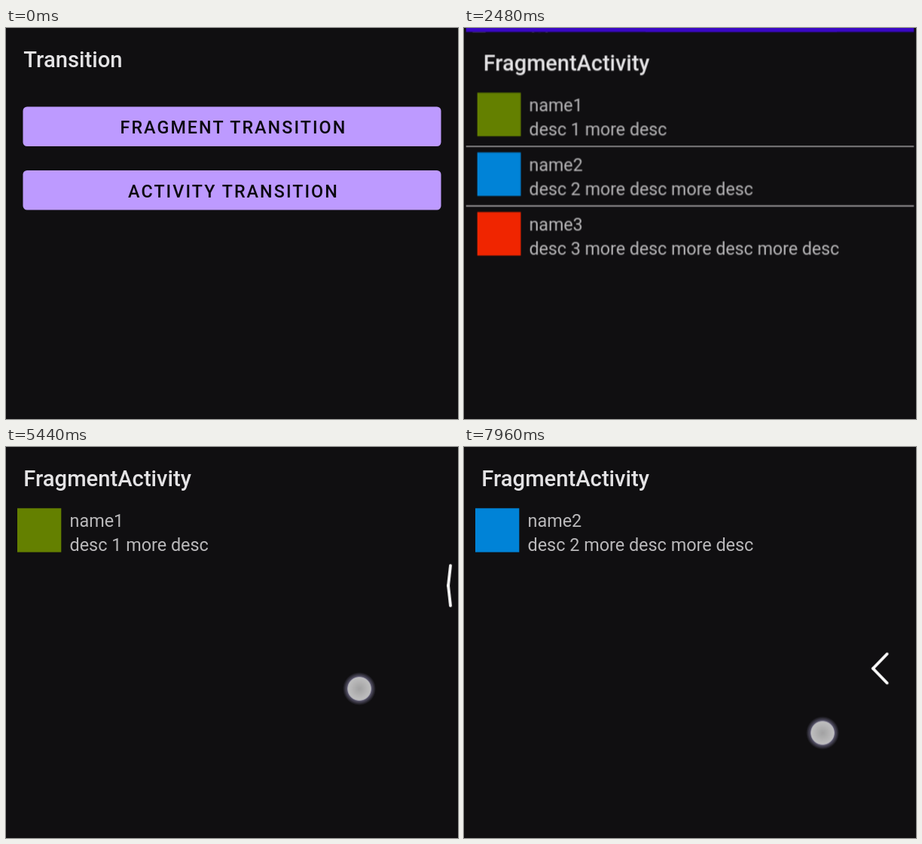
These frames come from a looping animation (600 px wide and 519 px high, 8000 ms). An HTML page:

```html
<!DOCTYPE html>
<html lang="en">
<head>
<meta charset="utf-8">
<title>Screen transitions</title>
<style>
  html, body { margin: 0; width: 100%; height: 100%; overflow: hidden; background: #100f11; }
  svg { display: block; width: 600px; height: 519px; font-family: Roboto, "Noto Sans", sans-serif; }
  svg * { animation: 8s linear infinite; }

  .title { font-size: 29.2px; font-weight: 500; fill: #e4e3e5; }
  .label { font-size: 23.3px; font-weight: 500; letter-spacing: .0893em; text-anchor: middle; fill: #0b0910; }
  .item { font-size: 23.4px; fill: #b9b8ba; }
  .bg { fill: #100f11; }
  .button { fill: #bd9aff; }
  .rule { fill: #b4b3b5; }

  /* 1% = 80 ms */
  .home, .list { transform-origin: 300px 590px; }
  .home { animation-name: grow; }
  .list { animation-name: open, appear; }
  @keyframes grow {
    0%, 28.675% { transform: scale(1); animation-timing-function: cubic-bezier(.3, 0, .8, .15); }
    29.512% { transform: scale(1.0192); animation-timing-function: cubic-bezier(.05, .7, .1, 1); }
    33.675%, 100% { transform: scale(1.048); }
  }
  @keyframes open {
    0%, 28.675% { transform: scale(.85); animation-timing-function: cubic-bezier(.3, 0, .8, .15); }
    29.512% { transform: scale(.91); animation-timing-function: cubic-bezier(.05, .7, .1, 1); }
    33.675%, 100% { transform: scale(1); }
  }
  @keyframes appear {
    0%, 29.3% { opacity: 0; }
    29.925%, 100% { opacity: 1; }
  }

  .ripple { animation-name: ripple, ripple-fade; }
  @keyframes ripple {
    0%, 25.8% { transform: translate(520px, 136px) scale(.05); animation-timing-function: cubic-bezier(.4, 0, .2, 1); }
    29.8%, 100% { transform: translate(300px, 131px) scale(1); }
  }
  @keyframes ripple-fade {
    0%, 25.8% { opacity: 0; }
    26.7%, 29.5% { opacity: .1; }
    31.5%, 100% { opacity: 0; }
  }

  .first { animation-name: first; animation-timing-function: step-end; }
  .second { animation-name: second, lift; animation-timing-function: step-end, linear; }
  .rest { animation-name: rest; animation-timing-function: step-end; }
  @keyframes first {
    0% { opacity: 1; }
    85.75%, 100% { opacity: 0; }
  }
  @keyframes second {
    0% { opacity: 1; }
    56.1% { opacity: 0; }
    73%, 100% { opacity: 1; }
  }
  @keyframes rest {
    0% { opacity: 1; }
    56.1% { opacity: 0; }
    73% { opacity: 1; }
    85.75%, 100% { opacity: 0; }
  }
  @keyframes lift {
    0%, 85.75% { transform: translateY(0); animation-timing-function: cubic-bezier(.37, 0, .63, 1); }
    89.5%, 100% { transform: translateY(-80px); }
  }

  .arrow { fill: none; stroke: #fff; stroke-width: 3.7; stroke-linecap: round; animation-name: slide, arrow-fade; }
  .leg { animation-name: bend; }
  @keyframes slide {
    0%, 67.25% { transform: translate(600px, 184px); }
    68% { transform: translate(587.5px, 184px); animation-timing-function: ease-out; }
    70% { transform: translate(543px, 184px); }
    72% { transform: translate(540px, 184px); }
    74.5%, 76% { transform: translate(552px, 184px); }
    90%, 97.25% { transform: translate(600px, 294px); }
    97.9% { transform: translate(587.5px, 294px); animation-timing-function: ease-out; }
    99.5%, 100% { transform: translate(543px, 294px); }
  }
  @keyframes arrow-fade {
    0%, 67.25% { opacity: 0; }
    67.9%, 72.5% { opacity: 1; }
    74.5%, 97.25% { opacity: 0; }
    97.9%, 100% { opacity: 1; }
  }
  @keyframes bend {
    0%, 67.25% { transform: rotate(0deg); }
    68% { transform: rotate(6deg); animation-timing-function: ease-out; }
    70%, 76% { transform: rotate(44deg); }
    90%, 97.25% { transform: rotate(0deg); }
    97.9% { transform: rotate(6deg); animation-timing-function: ease-out; }
    99.5%, 100% { transform: rotate(44deg); }
  }

  .touch { animation-name: move, press; }
  @keyframes move {
    0%, 32% { transform: translate(520px, 136px); }
    45%, 60% { transform: translate(505px, 126px); }
    66.4%, 66.5% { transform: translate(596px, 274px); }
    68% { transform: translate(469.5px, 320.5px); }
    69.5% { transform: translate(410px, 362px); }
    72%, 76% { transform: translate(385px, 390px); }
    80%, 90% { transform: translate(503px, 212px); }
    96%, 96.5% { transform: translate(596px, 384px); }
    99.5%, 100% { transform: translate(476px, 379.5px); }
  }
  @keyframes press {
    0%, 25.44% { opacity: 0; }
    25.45%, 26.5% { opacity: 1; }
    29%, 53.94% { opacity: 0; }
    53.95%, 54.6% { opacity: 1; }
    57%, 66.44% { opacity: 0; }
    66.45%, 72.2% { opacity: 1; }
    74.75%, 83.44% { opacity: 0; }
    83.45%, 84.1% { opacity: 1; }
    86.5%, 96.44% { opacity: 0; }
    96.45%, 100% { opacity: 1; }
  }
</style>
</head>
<body>
<svg viewBox="0 0 600 519">
  <defs>
    <radialGradient id="spot">
      <stop offset="0" stop-color="#fff" stop-opacity=".61"/>
      <stop offset=".66" stop-color="#fff" stop-opacity=".73"/>
      <stop offset=".7" stop-color="#f4f2ff" stop-opacity=".7"/>
      <stop offset=".74" stop-color="#b6b0e0" stop-opacity=".42"/>
      <stop offset="1" stop-color="#b6b0e0" stop-opacity="0"/>
    </radialGradient>
    <clipPath id="face"><rect x="22.5" y="104.5" width="555" height="52.5" rx="5.5"/></clipPath>
  </defs>

  <g class="home">
    <rect class="bg" y="-41" width="600" height="1300"/>
    <text class="title" x="23.3" y="51.7">Transition</text>
    <rect class="button" x="22.5" y="104.5" width="555" height="52.5" rx="5.5"/>
    <g clip-path="url(#face)"><circle class="ripple" r="282"/></g>
    <text class="label" x="302" y="140.2">FRAGMENT TRANSITION</text>
    <rect class="button" x="22.5" y="189" width="555" height="52.5" rx="5.5"/>
    <text class="label" x="302" y="224.6">ACTIVITY TRANSITION</text>
  </g>

  <g class="list">
    <rect class="bg" width="600" height="1250"/>
    <rect y="-41" width="600" height="41" fill="#3a08c4"/>
    <text class="title" x="23.3" y="51.7">FragmentActivity</text>
    <g class="item first">
      <rect x="15" y="81.3" width="58.3" height="58.3" fill="#648000"/>
      <text x="84.5" y="106.4">name1</text>
      <text x="84.5" y="138.1">desc 1 more desc</text>
    </g>
    <g class="item rest">
      <rect class="rule" y="152.2" width="600" height="1.6"/>
      <rect class="rule" y="232.2" width="600" height="1.6"/>
      <rect x="15" y="241.1" width="58.3" height="58.3" fill="#f02500"/>
      <text x="84.5" y="266.2">name3</text>
      <text x="84.5" y="297.9">desc 3 more desc more desc more desc</text>
    </g>
    <g class="item second">
      <rect x="15" y="161.3" width="58.3" height="58.3" fill="#0083d7"/>
      <text x="84.5" y="186.4">name2</text>
      <text x="84.5" y="218.1">desc 2 more desc more desc</text>
    </g>
  </g>

  <g class="arrow">
    <path class="leg" d="M0 0V-27"/>
    <g transform="scale(1 -1)"><path class="leg" d="M0 0V-27"/></g>
  </g>
  <g class="touch"><circle r="22" fill="url(#spot)"/></g>
</svg>
</body>
</html>
```
